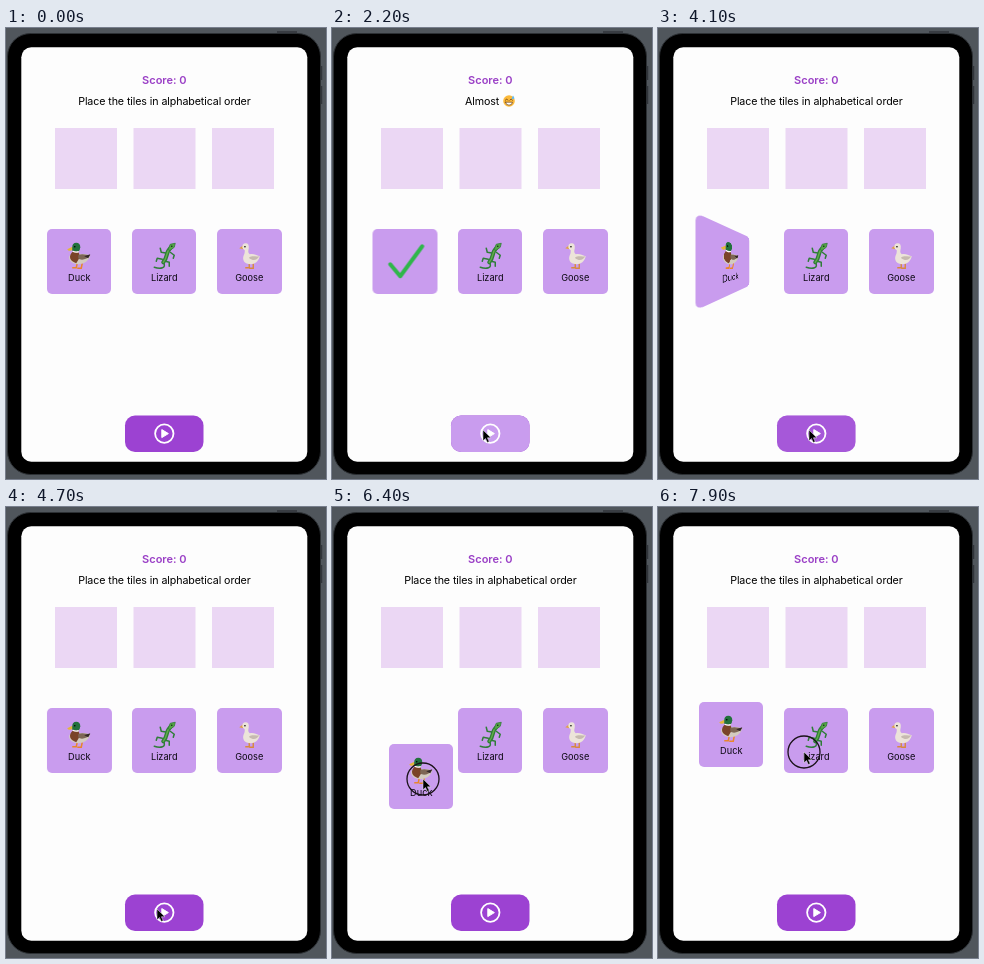
These frames come from a looping animation (320x451 px, 8000 ms). An HTML page:

```html
<!DOCTYPE html>
<html lang="en">
<head>
<meta charset="utf-8">
<style>
  html, body { margin: 0; width: 100%; height: 100%; overflow: hidden; }
  body { position: relative; background: #50565c; }
  svg { position: absolute; left: 0; top: 0; overflow: visible; }
  text { font-family: Inter, "Open Sans", sans-serif; text-anchor: middle; }
  .line { font-size: 10.7px; letter-spacing: -.01em; }
  .tile { position: absolute; top: 201px; width: 64.5px; height: 64.5px; border-radius: 5px; background: #c99cee; }
  .tile text { font-size: 9.2px; fill: #0c0812; }
</style>
</head>
<body>
<svg width="320" height="451">
  <path d="M271 4h20M315.5 38v14M315.5 58v18" stroke="#30343a" stroke-width="1.5"/>
  <rect x="1.5" y="5.5" width="313" height="441" rx="23" stroke="#2c3034"/>
  <rect x="15.3" y="19.3" width="286" height="414.4" rx="10" fill="#fdfdfd"/>
  <text x="158.3" y="55.5" font-size="11" font-weight="600" fill="#9a3fc6">Score: 0</text>
  <text id="prompt" class="line" x="158.4" y="76.5">Place the tiles in alphabetical order</text>
  <g id="almost">
    <text class="line" x="133" y="76.5" style="text-anchor:start">Almost</text>
    <g transform="translate(177 73)" fill="none" stroke="#6b3d12" stroke-linecap="round">
      <circle r="5.8" fill="#fbb93a" stroke="none"/>
      <path d="M-3.6-.8l1.2-1.2 1.2 1.2M1-.8l1.2-1.2 1.2 1.2" stroke-width=".9"/>
      <path d="M-3.5 1.2h7q-.5 3-3.5 3t-3.5-3z" fill="#fff" stroke-width=".7"/>
      <path d="M4-5.5q2.6 3.5 0 3.8t0-3.8z" fill="#65b9ed" stroke="none"/>
    </g>
  </g>
  <path d="M49 100h62v61h-62zM127.5 100h62v61h-62zM206 100h62v61h-62z" fill="#ebd7f4"/>
  <rect x="119" y="387.5" width="78.5" height="36.5" rx="10" fill="#9c42d2"/>
  <rect id="tint" x="119" y="387.5" width="78.5" height="36.5" rx="10" fill="#c99cee"/>
  <circle cx="158.3" cy="405.6" r="9.2" fill="none" stroke="#fff" stroke-width="1.8"/>
  <path d="M155.8 401.6l6.6 4-6.6 4z" fill="#fff" stroke="#fff" stroke-linejoin="round"/>
</svg>
<div id="tiles"></div>
<svg width="320" height="451">
  <g id="cursor">
    <circle id="ring" r="16" fill="none" stroke="#1a1218" stroke-width="1.3"/>
    <path d="M0 0v10.8l2.5-2.3 1.8 4 1.9-.9-1.8-3.8h3.5z" stroke="#eee" stroke-width=".5"/>
  </g>
</svg>
<script>
const $ = id => document.getElementById(id);

// Artwork is drawn around the tile centre.
const animals = {
  Duck: `<path d="M-2 2l-1 4.5h-4M3 2l-1 5h-4" fill="none" stroke="#e8862c" stroke-width="1.5"/>
    <path d="M-6-9c5 3 10 1 17 3-1 5-6 9-12 9-6 0-10-4-9-8z" fill="#d3cbc0"/>
    <path d="M-6-10h5q2 4 1 7l-3 5c-6-2-9-7-3-12z" fill="#7a4328"/>
    <path d="M-1-6c4-2 8 0 12 0-3 4-9 6-12 3z" fill="#7d6655"/>
    <path d="M5-5l6-2-2 4z" fill="#33282a"/>
    <path d="M-7-14.5l-5 2.5q1 2 3 1.5l3-1z" fill="#e3b63a"/>
    <path d="M-7-10.5v-3.5q0-4.5 4-4.5t4 4.5q0 2.5-2 4.5z" fill="#22713c"/>
    <path d="M-6.5-10q3 1.5 6 .3" fill="none" stroke="#fff" stroke-width="1.3"/>
    <circle cx="-4.5" cy="-14.5" r=".8"/>`,
  Lizard: `<g fill="none" stroke="#2f7d38" stroke-linecap="round" stroke-linejoin="round">
    <path d="M-1 1c4 6-3 7-9 5M3-8l-6-1-1-4M6-9l4 3-1 3M-2-2l-5-1-1 3M1 0l4 1 0 4" stroke-width="1.5"/>
    <path d="M6-13C1-9 4-4-1 1" stroke-width="4"/>
    <path d="M6-13C1-9 4-4-1 1" stroke="#62ad49" stroke-width="1.4"/>
    <path d="M4-12l2-5 5-1-1 4-4 3z" fill="#55a545" stroke-width=".8"/></g>
    <circle cx="7.5" cy="-15" r=".8" fill="#17281a"/>`,
  Goose: `<path d="M0 2v4.5h-4M4 2v5h-4" fill="none" stroke="#d78a3c" stroke-width="1.4"/>
    <path d="M-6-16l-4 3 4 1z" fill="#e0a045"/>
    <path d="M-7-14q0-4 3.5-4t3 5c-.5 3-1 4 1 6 4-1 6 1 10 2-1 5-5 8-9 8-6 0-9-4-7-9 1-2 1-3 1-5q-2-1-2.500-3z" fill="#ece4d9"/>
    <path d="M0-4c4-2 6 0 10-1-2 4-6 5-10 2z" fill="#c6bab0"/>
    <circle cx="-4.3" cy="-14.5" r=".8"/>`
};
$('tiles').innerHTML = Object.entries(animals).map(([name, art], i) => `
  <div class="tile" id="${name}" style="left:${40.5 + i * 85.3}px">
    <svg width="64.5" height="64.5" viewBox="-32.25 -32.25 64.5 64.5">
      <g class="front">${art}<text y="19.5">${name}</text></g>
    </svg>
  </div>`).join('');
const duck = $('Duck'), front = duck.querySelector('.front');
front.insertAdjacentHTML('afterend', `<path class="check" d="M-15 3L-5 15 17-15" transform="scale(-1 1)"
  fill="none" stroke="#2fb64b" stroke-width="4" stroke-linecap="round" stroke-linejoin="round"/>`);
const check = duck.querySelector('.check');

// Cursor path: time, x, y
const path = [
  [600, 150, 452], [1250, 151, 398], [1450, 151, 398], [1600, 151, 402],
  [4700, 151, 402], [5400, 70, 242], [5700, 70, 242], [6000, 75, 236],
  [6400, 91, 272], [7000, 65, 250], [7300, 75, 230], [7400, 75, 230],
  [7700, 143, 241], [7900, 146, 245], [8000, 146, 245]
];
const DRAG = [5900, 7400];
const presses = [[1500, 1650], DRAG, [7800, 8000]];

const clamp = (v, a, b) => Math.min(b, Math.max(a, v));
const ease = (t, a, b) => {
  const u = clamp((t - a) / (b - a), 0, 1);
  return u * u * (3 - 2 * u);
};
const during = (t, [a, b]) => t >= a && t < b;
const show = (el, on) => { el.style.display = on ? '' : 'none'; };

// Smooth curve through the path that never overshoots a point.
const slope = (i, k) => path[i] && path[i + 1]
  ? (path[i + 1][k] - path[i][k]) / (path[i + 1][0] - path[i][0]) : 0;
const tangent = (i, k) => {
  const a = slope(i - 1, k), b = slope(i, k);
  return a * b > 0 ? 2 * a * b / (a + b) : 0;
};
function cursorAt(t) {
  const next = path.findIndex(p => p[0] > t);
  const i = next < 0 ? path.length - 2 : Math.max(next - 1, 0);
  const span = path[i + 1][0] - path[i][0];
  const u = clamp((t - path[i][0]) / span, 0, 1), v = 1 - u;
  return [1, 2].map(k =>
    v * v * (1 + 2 * u) * path[i][k] + u * u * (1 + 2 * v) * path[i + 1][k] +
    span * u * v * (v * tangent(i, k) - u * tangent(i + 1, k)));
}

function draw(t) {
  const flip = ease(t, 1700, 2150) - ease(t, 3800, 4240);
  const hinting = during(t, [1700, 3800]);
  show($('almost'), hinting);
  show($('prompt'), !hinting);
  $('tint').style.opacity = flip;
  show(front, flip < .5);
  show(check, flip >= .5);

  const [dx, dy] = cursorAt(clamp(t, ...DRAG)), [sx, sy] = cursorAt(6000);
  const move = t < 6000 ? '' : `translate(${dx - sx}px, ${dy - sy}px)`;
  const turn = flip ? `perspective(65px) rotateY(${flip * 180}deg)` : '';
  duck.style.transform = `${move} ${turn}`;

  show($('cursor'), t >= path[0][0]);
  $('cursor').setAttribute('transform', `translate(${cursorAt(t)})`);
  show($('ring'), presses.some(p => during(t, p)));
}

const start = performance.now();
function tick() {
  draw((performance.now() - start) % 8000);
  requestAnimationFrame(tick);
}
tick();
</script>
</body>
</html>
```
